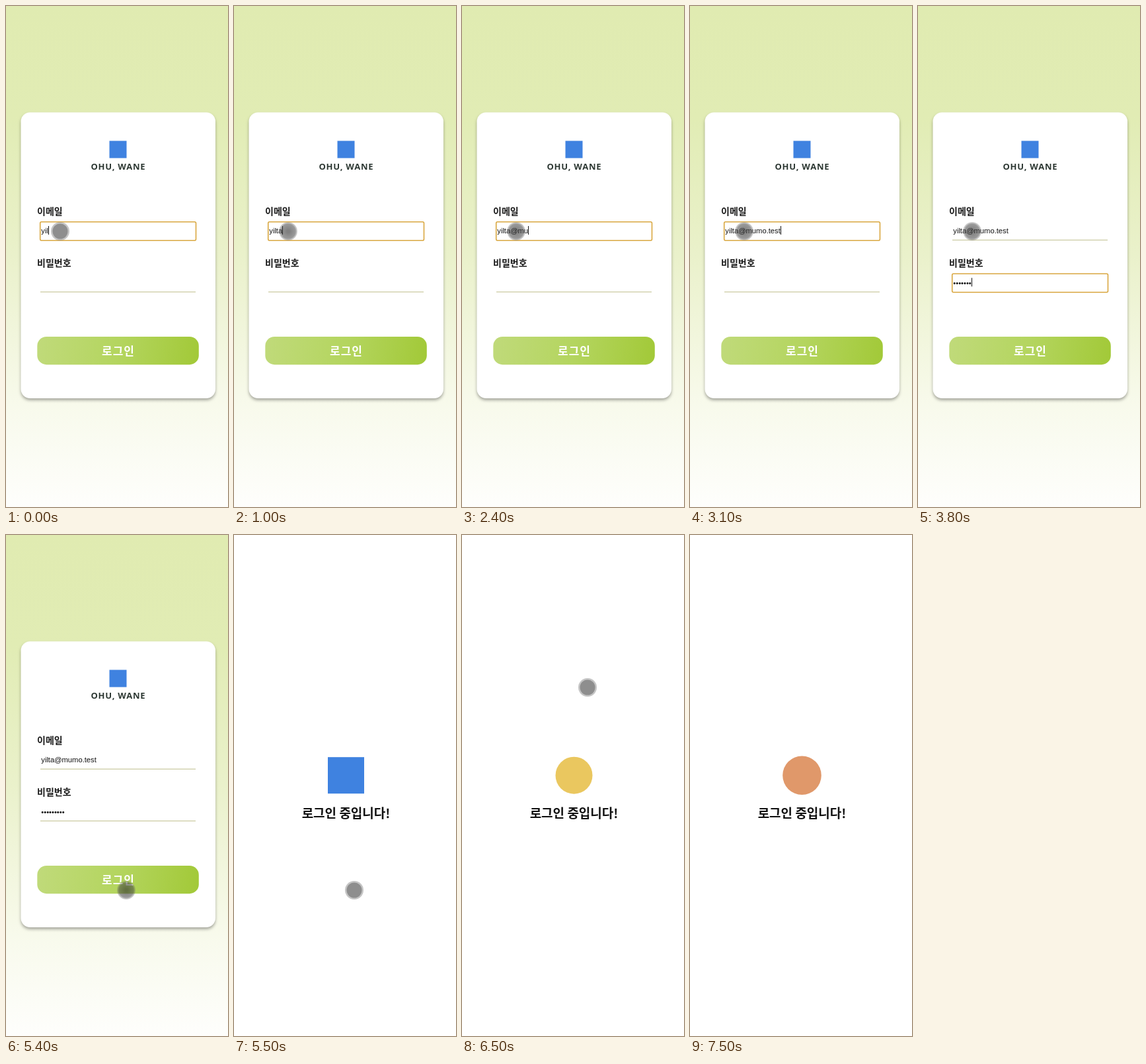
Animation, 336 px wide and 756 px high, one loop 7.6 s. Source, as an HTML page with a canvas:

```html
<!DOCTYPE html>
<html lang="ko">
<head>
<meta charset="utf-8">
<title>로그인</title>
<style>
  html, body { margin: 0; width: 100%; height: 100%; overflow: hidden; background: #fff; }
  canvas { display: block; width: 336px; height: 756px; }
</style>
</head>
<body>
<canvas id="stage"></canvas>
<script>
const W = 336, H = 756, LOOP = 7600, STEP = 100;
const LOADING = 5500;
const KOREAN = '"Noto Sans CJK KR", "Noto Sans CJK", "Noto Sans CJK JP", sans-serif';
const INPUT = '11.2px "Liberation Sans", Arial, sans-serif';
const BLUE = '#3f82e0', ORANGE = '#e0986a', YELLOW = '#eac75f';

const EMAIL = 'yilta@mumo.test';
const EMAIL_KEYS = [-1, -1, -1, 300, 600, 1500, 2000, 2300, 2500, 2600, 2700, 2800, 2900, 3000, 3100];
const PASSWORD_KEYS = [3200, 3300, 3400, 3500, 3600, 3700, 3800, 3900, 4000];

// Pointer stops: time, x, y
const PATH = [
  [0, 82, 340], [4300, 82, 340], [5000, 182, 536], [5700, 182, 536],
  [6300, 203, 227], [6400, 200, 227], [6500, 190, 230]
];

const canvas = document.getElementById('stage');
const ctx = canvas.getContext('2d');
const ratio = window.devicePixelRatio || 1;
canvas.width = W * ratio;
canvas.height = H * ratio;
ctx.scale(ratio, ratio);

const clamp = v => Math.max(0, Math.min(1, v));
const smooth = v => v * v * (3 - 2 * v);
const typed = (keys, t) => keys.filter(k => k <= t).length;

function text(str, x, y, font, color, align = 'left', spacing = 0) {
  ctx.font = font;
  ctx.fillStyle = color;
  ctx.textAlign = align;
  ctx.letterSpacing = spacing + 'px';
  ctx.fillText(str, x + (align === 'center' ? spacing / 2 : 0), y);
  ctx.letterSpacing = '0px';
}

function roundBox(x, y, w, h, r) {
  ctx.beginPath();
  ctx.roundRect(x, y, w, h, r);
}

function circle(x, y, r, color) {
  ctx.fillStyle = color;
  ctx.beginPath();
  ctx.arc(x, y, r, 0, Math.PI * 2);
  ctx.fill();
}

function square(x, y, size, color) {
  ctx.fillStyle = color;
  ctx.fillRect(x - size / 2, y - size / 2, size, size);
}

function gradient(x0, y0, x1, y1, stops) {
  const g = ctx.createLinearGradient(x0, y0, x1, y1);
  stops.forEach(([at, color]) => g.addColorStop(at, color));
  return g;
}

function card() {
  ctx.save();
  ctx.shadowColor = 'rgba(0, 0, 0, 0.32)';
  ctx.shadowBlur = 4 * ratio;
  ctx.shadowOffsetY = 3 * ratio;
  ctx.fillStyle = '#fff';
  roundBox(22.5, 160.5, 294.5, 431.5, 14);
  ctx.fill();
  ctx.restore();
}

function field(y, value, focused) {
  if (focused) {
    ctx.strokeStyle = '#d9a740';
    ctx.lineWidth = 1.6;
    roundBox(51.7, y + 0.7, 235.8, 28, 2);
    ctx.stroke();
  } else {
    ctx.fillStyle = '#c9c89f';
    ctx.fillRect(52, y + 27.6, 235, 1.2);
  }
  text(value, 53.3, y + 18.2, INPUT, '#111');
  if (focused) {
    ctx.fillStyle = '#111';
    ctx.fillRect(Math.round(53.3 + ctx.measureText(value).width), y + 7, 1, 13);
  }
}

function login(t) {
  ctx.fillStyle = gradient(0, 0, 0, H, [[0, '#e0ebb1'], [0.22, '#e1ecb4'], [0.5, '#eaf1cb'], [0.8, '#f8faec'], [1, '#fefefc']]);
  ctx.fillRect(0, 0, W, H);
  card();

  square(169.5, 216.5, 26, BLUE);
  text('OHU, WANE', 169.5, 246.5, 'bold 13px "Noto Sans", sans-serif', '#2d3833', 'center', 0.8);

  text('이메일', 47, 315, 'bold 14px ' + KOREAN, '#1b1b1b');
  text('비밀번호', 47, 392.7, 'bold 14px ' + KOREAN, '#1b1b1b');

  field(325, EMAIL.slice(0, typed(EMAIL_KEYS, t)), t < 3200);
  field(403.3, '•'.repeat(typed(PASSWORD_KEYS, t)), t >= 3200 && t < 5200);

  ctx.fillStyle = gradient(47, 505, 292, 535, [[0, '#c0da7a'], [0.5, '#b4d55f'], [1, '#a2c938']]);
  roundBox(47.3, 499, 244.5, 42.2, 14);
  ctx.fill();
  text('로그인', 169.5, 526.5, 'bold 17px ' + KOREAN, '#fff', 'center', 1);
}

const shapes = [
  (x, y) => square(x, y, 55, BLUE),
  (x, y) => circle(x, y, 28, YELLOW),
  (x, y) => circle(x, y, 29.3, ORANGE)
];

function loading(t) {
  ctx.fillStyle = '#fff';
  ctx.fillRect(0, 0, W, H);
  const age = t - LOADING;
  const index = Math.min(1, Math.floor(age / 1000));
  const fade = smooth(clamp((age - index * 1000 - 100) / 600));
  [1 - fade, fade].forEach((alpha, i) => {
    ctx.globalAlpha = alpha;
    shapes[index + i](169.5, 362.7);
  });
  ctx.globalAlpha = 1;
  text('로그인 중입니다!', 169.5, 426.5, 'bold 19px ' + KOREAN, '#111', 'center');
}

function pointerAt(t) {
  let i = 0;
  while (i < PATH.length - 1 && PATH[i + 1][0] <= t) i++;
  const a = PATH[i], b = PATH[i + 1] || a;
  const k = a === b ? 0 : smooth((t - a[0]) / (b[0] - a[0]));
  return [a[1] + (b[1] - a[1]) * k, a[2] + (b[2] - a[2]) * k];
}

function pointer(t) {
  if (t >= 7400) return;
  const [x, y] = pointerAt(t);
  if (t >= 800 && t < LOADING) {
    const g = ctx.createRadialGradient(x, y, 2, x, y, 14);
    g.addColorStop(0, 'rgba(50, 50, 50, 0.62)');
    g.addColorStop(0.75, 'rgba(70, 70, 70, 0.55)');
    g.addColorStop(1, 'rgba(110, 110, 110, 0.25)');
    circle(x, y, 14, g);
  } else {
    circle(x, y, 14, 'rgba(110, 110, 110, 0.4)');
    circle(x, y, 11.5, 'rgba(110, 110, 110, 0.63)');
  }
}

function draw() {
  const t = Math.floor(performance.now() % LOOP / STEP) * STEP;
  if (t < LOADING) login(t);
  else loading(t);
  pointer(t);
  requestAnimationFrame(draw);
}
draw();
</script>
</body>
</html>
```
